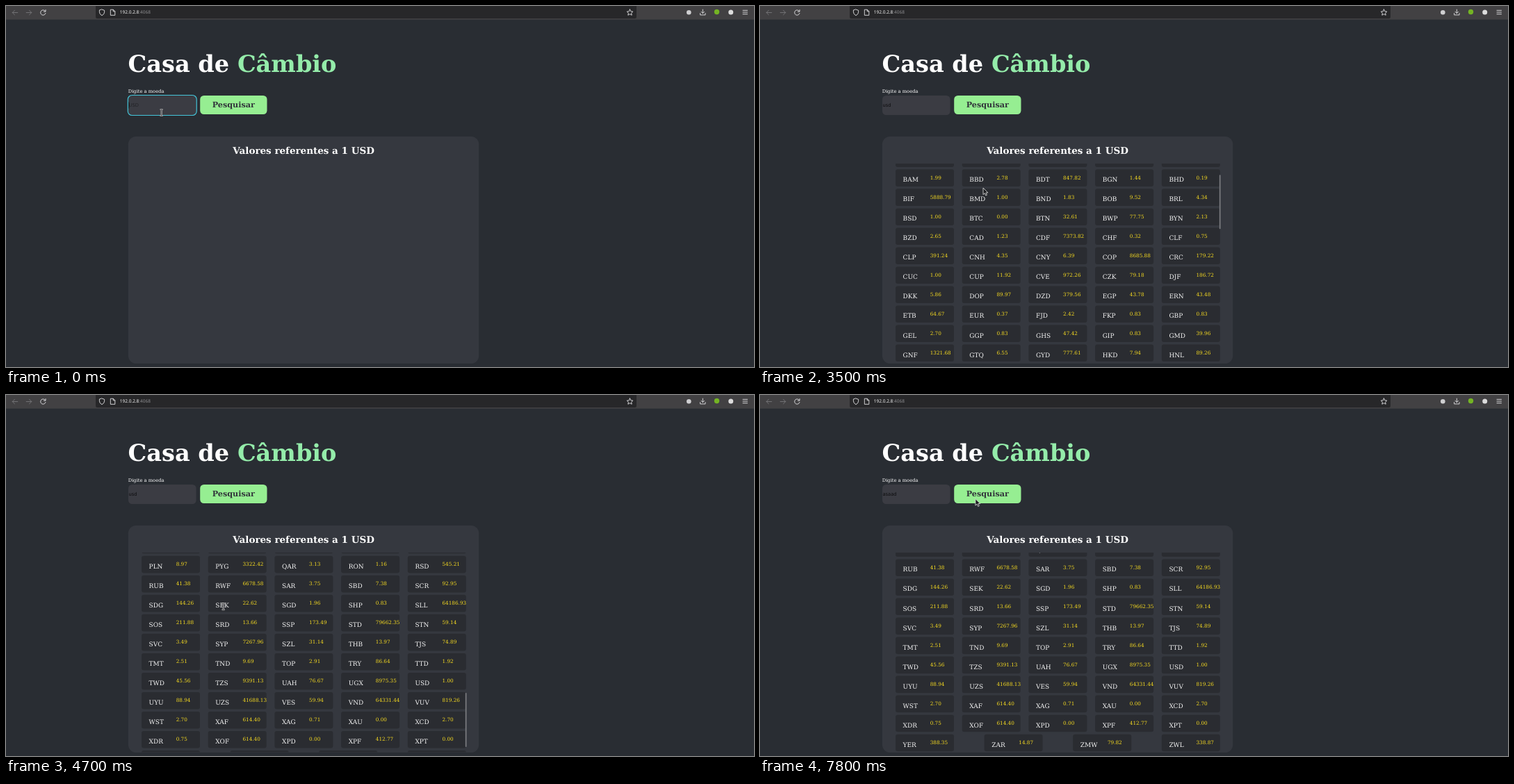
An HTML page for the animation above (8 s loop, 1076 by 520 pixels).

```html
<!DOCTYPE html>
<html lang="pt">
<head>
<meta charset="utf-8">
<title>Casa de Câmbio</title>
<style>
html, body { margin: 0; width: 100%; height: 100%; overflow: hidden; background: #292d33; }
svg { display: block; width: 1076px; height: 520px; }
text { font-family: "DejaVu Serif", serif; fill: #fff; text-rendering: geometricPrecision; white-space: pre; }
.bold { font-weight: bold; }
.code { font-size: 8.97px; fill: #f4f4f4; }
.rate { font-size: 7.285px; fill: #f8dc20; }
.field { font-family: "DejaVu Sans", sans-serif; font-size: 6.72px; }
.url { font-family: "Noto Sans", sans-serif; font-size: 6.5px; fill: #f2f2f2; }
.icon { fill: none; stroke: #e4e4e6; stroke-width: .9; stroke-linecap: round; stroke-linejoin: round; }
.dim { stroke: #77777a; }
</style>
</head>
<body>
<svg viewBox="0 0 1076 520" xmlns="http://www.w3.org/2000/svg">
  <defs><clipPath id="view"><rect x="176" y="227" width="504" height="287.4"/></clipPath></defs>
  <rect width="1076" height="520" fill="#292d33"/>

  <rect width="1076" height="19.6" fill="#424143"/>
  <path d="M129 0H907V15.5q0 2.5-2.5 2.5H131.5q-2.5 0-2.5-2.5Z" fill="#272729"/>
  <g class="icon">
    <path class="dim" d="M16.8 9.5H9.2M12.5 6.2 9.2 9.5l3.3 3.3M29.2 9.5h7.6M33.5 6.2l3.3 3.3-3.3 3.3"/>
    <path d="M56.6 7.6A3.7 3.7 0 1 0 57 10.4M57 5.5V8.1H54.4"/>
    <path d="M138 5l3.6 1.3v2.5q0 3-3.6 4.9-3.6-1.9-3.6-4.9V6.3Z"/>
    <path d="M150.7 5.2h3.6l2.5 2.5v5.6h-6.1ZM154.2 5.4v2.4h2.5"/>
    <path d="M897.5 4.9l1.3 2.8 3 .4-2.2 2.1.6 3-2.7-1.5-2.7 1.5.6-3-2.2-2.1 3-.4Z"/>
    <path d="M1002.3 5v5.3M1000 8.2l2.3 2.3 2.3-2.3M998.6 10.5v2.4h7.4v-2.4"/>
    <path d="M1060 6.3h6.500M1060 9h6.5M1060 11.7h6.5"/>
  </g>
  <circle cx="982.3" cy="9.2" r="3.3" fill="#cfcfd1"/>
  <circle cx="1022.5" cy="8.5" r="3.7" fill="#74b424"/>
  <circle cx="1042.7" cy="9" r="3.5" fill="#dcdcdc"/>
  <text class="url" x="163.8" y="11.4">192.0.2.8<tspan fill="#8d8d90">:4068</tspan></text>

  <text class="bold" x="175.5" y="95.3" font-size="33.6">Casa de <tspan fill="#94ecaa">Câmbio</tspan></text>
  <text x="175.8" y="125.2" font-size="6.72">Digite a moeda</text>
  <rect x="176" y="129" width="97.6" height="28" rx="5.5" fill="#3b3c43"/>
  <rect id="ring" x="175.3" y="128.5" width="98.9" height="29" rx="6" fill="none" stroke="#45c6da" stroke-width="1.2"/>
  <text id="entry" class="field" x="176.5" y="144.8"></text>
  <rect id="caret" y="138.3" width=".7" height="9.2" fill="#0c0c0e"/>
  <rect x="279.2" y="129" width="96.3" height="27.1" rx="5.5" fill="#96ee92"/>
  <text class="bold" x="327.3" y="146.3" font-size="11.2" text-anchor="middle" style="fill:#32353b">Pesquisar</text>

  <rect x="175.8" y="188" width="504.5" height="327" rx="11.5" fill="#35383f"/>
  <text class="bold" x="428.1" y="212.9" font-size="13.5" text-anchor="middle">Valores referentes a 1 USD</text>
  <g id="list" clip-path="url(#view)">
    <g id="rows"></g>
    <rect id="thumb" x="660.8" width="1.7" height="78" rx=".8" fill="#7b7c80"/>
  </g>

  <g id="cursor">
    <path id="arrow" d="M0 0V9.6L2.2 7.6 3.8 11 5.4 10.3 3.9 7H6.9Z" fill="#1d1e21" stroke="#e6e6e6" stroke-width=".8" stroke-linejoin="round"/>
    <g id="beam" fill="none">
      <path d="M-2-4.5H2M0-4.5V4.5M-2 4.5H2" stroke="#dcdcdc" stroke-width="1.9"/>
      <path d="M-2-4.5H2M0-4.5V4.5M-2 4.5H2" stroke="#1d1e21" stroke-width=".7"/>
    </g>
  </g>
</svg>
<script>
const $ = id => document.getElementById(id);
const LOOP = 8000, STEP = 100;
const PITCH = 28.02, TOP = 230.3, LEFT = 195, SPAN = 382.8, COLS = 5;

// Currencies by the form of their rate; each # becomes a seeded random digit.
const forms = {
  '0.00': 'BTC XAU XPD XPT',
  '0.83': 'FKP GBP GGP GIP IMP JEP SHP',
  '1.00': 'BMD BSD CUC PAB USD',
  '2.70': 'GEL WST XCD',
  '614.40': 'XAF XOF',
  '0.##': 'BHD CHF CLF EUR JOD KWD KYD OMR XAG XDR',
  '1.##': 'ANG AUD AWG AZN BAM BGN BND CAD NZD SGD',
  '2.##': 'BBD BYN BZD FJD TOP',
  '#.##': 'AED BOB BRL CNH CNY DKK GTQ HKD HRK ILS LYD MOP MYR NOK PEN PGK PLN QAR RON SAR SBD SVC TMT TND TTD',
  '##.##': 'AFN BTN BWP CUP CZK DOP EGP ERN ETB GHS GMD HNL INR KGS LSL MAD MDL MKD MRU MUR MVR ' +
    'MXN MZN NAD NIO PHP RUB SCR SEK SRD STN SZL THB TJS TRY TWD UAH UYU VES ZAR ZMW',
  '###.##': 'ALL AMD AOA ARS BDT CLP CRC CVE DJF DZD GYD HTG HUF ISK JMD JPY KES KMF KPW KZT ' +
    'LKR LRD NGN NPR PKR RSD SDG SOS SSP VUV XPF YER ZWL',
  '####.##': 'BIF CDF COP GNF IQD KHR KRW LBP MGA MMK MNT MWK PYG RWF SYP TZS UGX',
  '#####.##': 'IDR IRR LAK SLL STD UZS VND'
};

let seed = 7;
const random = () => (seed = seed * 16807 % 2147483647) / 2147483647;
const digit = () => 1 + Math.floor(random() * 9);

const quotes = Object.entries(forms)
  .flatMap(([form, codes]) => codes.split(' ').map(code => [code, form.replace(/#/g, digit)]))
  .sort((a, b) => a[0] < b[0] ? -1 : 1);

const card = (x, y, code, rate) =>
  `<rect x="${x}" y="${y}" width="84" height="24.6" rx="3" fill="#2a2c31"/>
   <text class="code" x="${x + 10.6}" y="${y + 18}">${code}</text>
   <text class="rate" x="${x + 49.7}" y="${y + 14.4}">${rate}</text>`;

$('rows').innerHTML = quotes.map(([code, rate], i) => {
  const col = i % COLS, row = (i - col) / COLS;
  const inRow = Math.min(COLS, quotes.length - row * COLS);
  return card(LEFT + col * SPAN / (inRow - 1), TOP + row * PITCH, code, rate);
}).join('');

// Moves: [start, end, ...where to]
const scrolls = [[3300, 3500, 51], [3500, 4000, 194.8], [4000, 4300, 576.3], [4500, 4800, 666.3]];
const moves = [
  [1200, 1700, 418, 168], [1700, 2100, 360.3, 152], [2600, 3500, 321, 262],
  [3500, 3900, 312.6, 304.8], [5100, 5300, 225.4, 214], [5300, 5600, 226.3, 167.3],
  [5900, 6000, 238, 136], [6700, 7200, 309.9, 149.5]
];
const typing = [
  [0, ''], [400, 'u'], [500, 'us'], [700, 'usd'], [6300, 'us'], [6400, 'u'],
  [6600, ''], [6800, 'a'], [7100, 'asa'], [7200, 'asaad']
];

const clamp = v => Math.max(0, Math.min(1, v));
const ease = p => p * p * (3 - 2 * p);
const within = (v, from, to) => v >= from && v < to;
const show = (id, on) => $(id).setAttribute('visibility', on ? 'visible' : 'hidden');

const follow = (track, t, from) => track.reduce((at, [start, end, ...to]) => {
  const p = ease(clamp((t - start) / (end - start)));
  return at.map((v, i) => v + (to[i] - v) * p);
}, from);

function overText(x, y, offset) {
  const overField = within(x, 176, 274) && within(y, 129, 157);
  const cardX = (x - LEFT) % (SPAN / (COLS - 1)), cardY = (y - TOP + offset) % PITCH;
  return overField || y > 227 && within(cardX, 10, 33) && within(cardY, 9, 20);
}

function draw(t) {
  const typed = typing.findLast(([from]) => from <= t)[1];
  const focused = t < 2200 || within(t, 6200, 7500);
  const entry = $('entry');
  entry.textContent = typed || 'USD';
  entry.style.fill = typed ? '#0c0c0e' : '#222327';
  $('caret').setAttribute('x', 176.5 + (typed ? entry.getComputedTextLength() : 0));
  show('caret', focused && !within(t, 1100, 2200));
  show('ring', focused);

  const [offset] = follow(scrolls, t, [0]);
  $('rows').setAttribute('transform', `translate(0 ${-offset})`);
  $('thumb').setAttribute('y', 227.3 + offset * .3138);
  $('thumb').setAttribute('opacity', clamp((6600 - t) / 500));
  $('list').style.display = t < 2400 ? 'none' : '';

  const [x, y] = follow(moves, t, [223.6, 153.6]);
  const beam = overText(x, y, offset);
  $('cursor').setAttribute('transform', `translate(${x} ${y})`);
  show('arrow', !beam);
  show('beam', beam);
}

const start = performance.now();
let shown = -1;
function tick() {
  const t = Math.floor((performance.now() - start) % LOOP / STEP) * STEP;
  if (t !== shown) draw(shown = t);
  requestAnimationFrame(tick);
}
tick();
</script>
</body>
</html>
```
